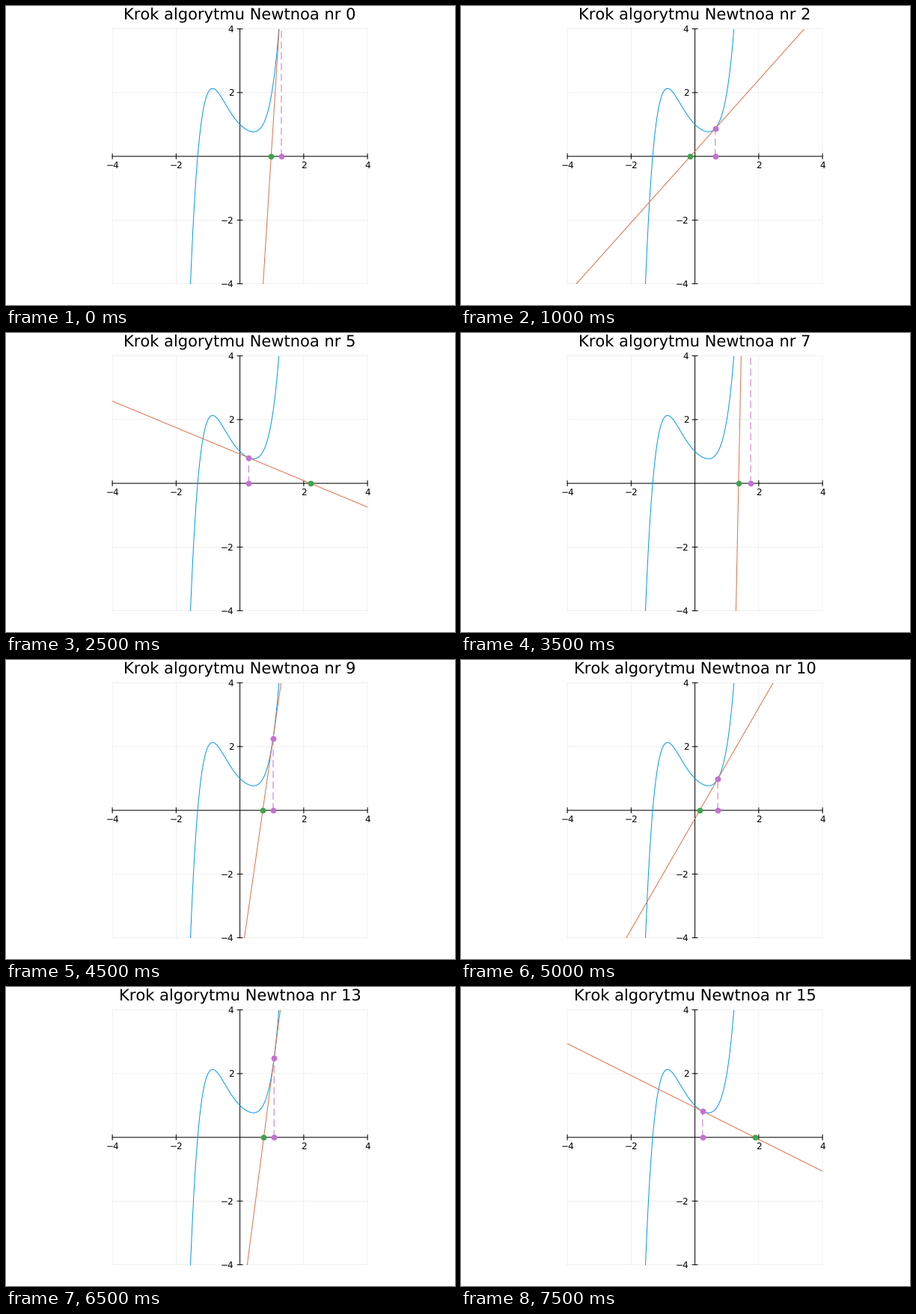
These frames come from a looping animation (600x400 px, 8000 ms). A matplotlib script:

```python
import matplotlib.pyplot as plt
import numpy as np
from matplotlib.animation import FuncAnimation

W, H = 600, 400
PX = 0.72                      # one pixel in points at 100 dpi
CX, CY, HALF = 312.6, 201.1, 170.5
LIM, STEPS = 4, 16
BLUE, ORANGE, GREEN, PURPLE = "#009afa", "#e36f47", "#3ea44e", "#c371d2"

plt.rcParams.update({
    "font.family": "DejaVu Sans",
    "text.hinting": "none",
    "text.hinting_factor": 1,
    "lines.scale_dashes": False,
})


def f(x):
    return x**5 + x**2 - x + 1


def df(x):
    return 5 * x**4 + 2 * x - 1


def newton(x, n):
    xs = [x]
    for _ in range(n):
        x -= f(x) / df(x)
        xs.append(x)
    return xs


fig = plt.figure(figsize=(W / 100, H / 100), dpi=100, facecolor="white")
ax = fig.add_axes([(CX - HALF) / W, 1 - (CY + HALF) / H, 2 * HALF / W, 2 * HALF / H])
ax.set(xlim=(-LIM, LIM), ylim=(-LIM, LIM))
ax.axis("off")


def line(xs, ys, color, width=1.0, **kw):
    return ax.plot(xs, ys, color=color, lw=width * PX, snap=False, **kw)[0]


def dots(color):
    return ax.plot([], [], "o", color=color, ms=7.8 * PX, mew=0, snap=False, zorder=5)[0]


def label(x, y, s, size, ha="center"):
    return fig.text(x / W, 1 - y / H, s, fontsize=size * PX, ha=ha, va="baseline")


unit = HALF / LIM
tick = 3.4 / unit
for v in (-4, -2, 0, 2, 4):
    grid = dict(color="black", alpha=0.1, width=0.6, clip_on=False, zorder=1)
    line([v, v], [-LIM, LIM], **grid)
    line([-LIM, LIM], [v, v], **grid)
    if v:
        line([v, v], [-tick, tick], "black", clip_on=False, zorder=2)
        line([-tick, tick], [v, v], "black", clip_on=False, zorder=2)
        text = str(v).replace("-", "\u2212")
        label(CX + v * unit, 217, text, 11.86)
        label(304.5, CY - v * unit + 4.4, text, 11.86, "right")
line([-LIM, LIM], [0, 0], "black", clip_on=False, zorder=2)
line([0, 0], [-LIM, LIM], "black", clip_on=False, zorder=2)

curve_x = np.linspace(-1.7, 1.4, 600)
line(curve_x, f(curve_x), BLUE, zorder=3)
tangent = line([], [], ORANGE, zorder=3)
drop = line([], [], PURPLE, zorder=4, linestyle=(0, (9.6 * PX, 4.8 * PX)),
            dash_capstyle="butt")
root_dot = dots(GREEN)
point_dots = dots(PURPLE)
title = label(CX, 18.2, "", 20.75)

path = newton(1.3, STEPS)
ends = np.array([-LIM, LIM])


def update(i):
    x, y = path[i], f(path[i])
    title.set_text(f"Krok algorytmu Newtnoa nr {i}")
    tangent.set_data(ends, y + df(x) * (ends - x))
    drop.set_data([x, x], [0, y])
    root_dot.set_data([path[i + 1]], [0])
    point_dots.set_data([x, x], [0, y])
    return title, tangent, drop, root_dot, point_dots


anim = FuncAnimation(fig, update, frames=STEPS, interval=500, repeat=True,
                     repeat_delay=0, blit=False)
plt.show()
```
